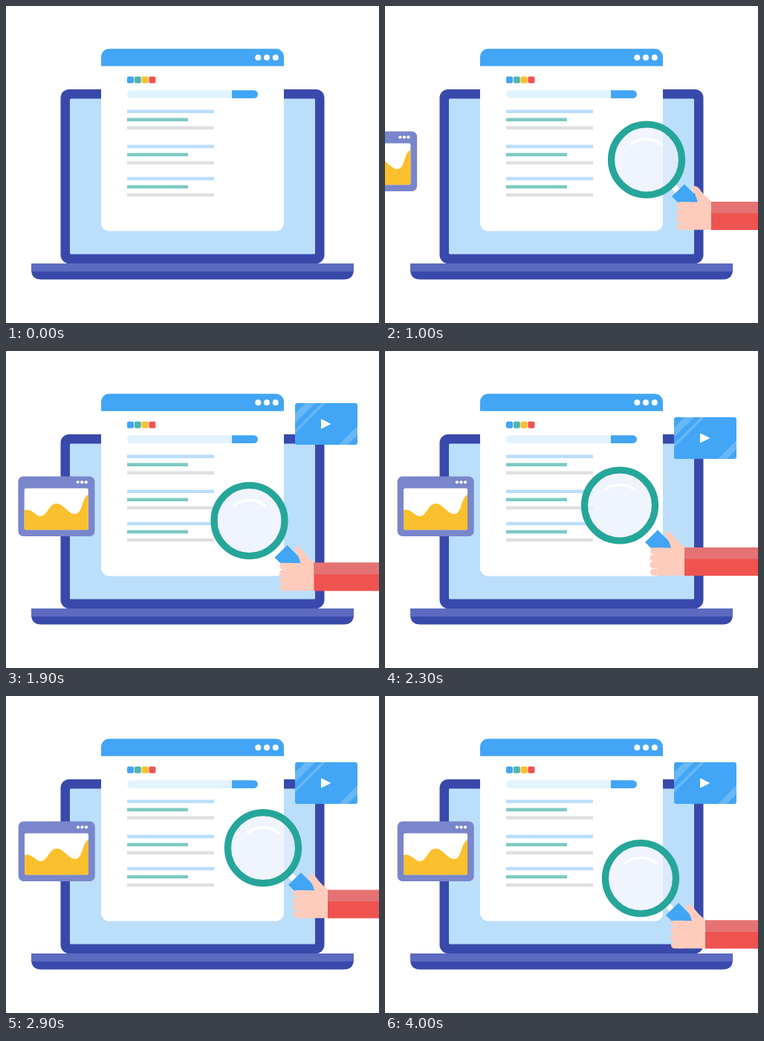
Write an HTML page that moves like this. It is 502 by 426 pixels and loops after 5 s.

```html
<!DOCTYPE html>
<html lang="en">
<head>
<meta charset="utf-8">
<title>Search illustration</title>
<style>
  html, body { margin: 0; width: 100%; height: 100%; overflow: hidden; background: #fff; }
  svg { display: block; width: 100vw; height: 100vh; }
</style>
</head>
<body>
<svg viewBox="0 0 502 426">
  <defs>
    <clipPath id="cardClip"><rect x="389" y="89" width="84" height="56" rx="3"/></clipPath>
    <g id="result">
      <path d="M163 2.2H280" stroke="#bbdefb"/>
      <path d="M163 13.2H245" stroke="#7ecac3"/>
      <path d="M163 24.2H280" stroke="#e0e0e0"/>
    </g>
  </defs>

  <g id="laptop">
    <rect x="73.5" y="112" width="355" height="234" rx="11.5" fill="#3949ab"/>
    <rect x="86" y="124.5" width="330" height="209" rx="1.5" fill="#bbdefb"/>
    <path d="M34 346H468V354Q468 367.5 454.500 367.5H47.500Q34 367.5 34 354Z" fill="#3949ab"/>
    <path d="M34 346H468V356.700H34Z" fill="#5c6bc0"/>
  </g>

  <g id="page">
    <rect x="128" y="57.5" width="246" height="245" rx="11" fill="#fff"/>
    <path d="M128 80.700V68.500A11 11 0 0 1 139 57.500H363A11 11 0 0 1 374 68.500V80.700Z" fill="#42a5f5"/>
    <g fill="#fff">
      <circle cx="339.300" cy="69.200" r="4"/><circle cx="351" cy="69.200" r="4"/><circle cx="362.800" cy="69.200" r="4"/>
    </g>
    <rect x="163" y="94.800" width="9" height="9" rx="2" fill="#42a5f5"/>
    <rect x="172.800" y="94.800" width="9" height="9" rx="2" fill="#4db6ac"/>
    <rect x="182.600" y="94.800" width="9" height="9" rx="2" fill="#fbc02d"/>
    <rect x="192.400" y="94.800" width="9" height="9" rx="2" fill="#ef5350"/>
    <rect x="163" y="113.200" width="160" height="10.800" rx="5.400" fill="#e1f3fe"/>
    <path d="M304 113.200H333.600A5.400 5.400 0 0 1 333.600 124H304Z" fill="#42a5f5"/>
    <g stroke-width="4.500">
      <use href="#result" y="139.500"/><use href="#result" y="186.500"/><use href="#result" y="229.800"/>
    </g>
  </g>

  <g id="chart">
    <rect x="16.700" y="168.500" width="103" height="80.500" rx="7" fill="#7986cb"/>
    <g fill="#fff">
      <circle cx="97" cy="176.300" r="2.100"/><circle cx="102.500" cy="176.300" r="2.100"/><circle cx="108" cy="176.300" r="2.100"/>
      <rect x="25" y="184.500" width="86" height="55.700" rx="2"/>
    </g>
    <path d="M25 214C34 210 40 222 47 222C56 222 58 205 68 205C78 205 84 219 93 219C104 219 101 199 111 193V238.200Q111 240.200 109 240.200H27Q25 240.200 25 238.200Z" fill="#fbc02d"/>
  </g>

  <g id="video">
    <g clip-path="url(#cardClip)">
      <rect x="389" y="89" width="84" height="56" fill="#42a5f5"/>
      <path d="M403 89H416L389 116V103ZM425 89H430L389 130V125ZM448 145H460L473 132V120Z" fill="#68b7f7"/>
    </g>
    <path d="M424.500 111L436.500 117L424.500 123Z" fill="#fff" stroke="#fff" stroke-linejoin="round"/>
  </g>

  <g id="glass">
    <path d="M34 34L45 45" stroke="#fff" stroke-width="8"/>
    <path d="M51 33L79 61L62 77L34 49.500Z" fill="#42a5f5"/>
    <circle r="47.500" fill="#eaeffc" fill-opacity=".7"/>
    <circle r="47.500" fill="none" stroke="#26a69a" stroke-width="9.200"/>
    <path d="M-20.500 -20.500A33 33 0 0 1 20.500 -20.500" fill="none" stroke="#fff" stroke-width="3.500" stroke-linecap="round"/>
    <g fill="#ffccbc">
      <path d="M61.500 40Q60 36 64 35.500Q68 35 71 39Q77 48 87.500 56V94.200H51V57H69Q67 49 61.500 40Z"/>
      <rect x="41" y="56.700" width="20" height="8.700" rx="4"/>
      <rect x="40.500" y="66" width="20" height="9.200" rx="4.400"/>
      <rect x="40.500" y="75.400" width="20" height="9.200" rx="4.400"/>
      <rect x="41" y="85" width="20" height="9.200" rx="4.400"/>
    </g>
    <rect x="87" y="56.500" width="200" height="38" fill="#ef5350"/>
    <rect x="87" y="56.500" width="200" height="15.500" fill="#e57373"/>
  </g>
</svg>
<script>
const LOOP = 5000, STEP = 100;
const el = id => document.getElementById(id);
const chart = el('chart'), video = el('video'), glass = el('glass');

// Lens centre: time, x, y
const path = [
  [300, 572, 241], [600, 482, 233], [1000, 352, 206.5], [1400, 321, 202.2],
  [1650, 333, 215], [1900, 327.5, 228], [2100, 319.5, 228], [2300, 316, 207.5],
  [2600, 329, 182.5], [2900, 346, 204.2], [3200, 344, 245]
];

const progress = (t, start, end) => Math.min(1, Math.max(0, (t - start) / (end - start)));
const easeOut = u => Math.sin(u * Math.PI / 2);
const easeInOut = u => (1 - Math.cos(u * Math.PI)) / 2;

function slope(i, k) {
  const a = path[i - 1], b = path[i + 1];
  if (!b) return 0;
  return a ? (b[k] - a[k]) / (b[0] - a[0]) : (b[k] - path[i][k]) / (b[0] - path[i][0]);
}

// Smooth curve through the path points
function along(t, k) {
  const last = path.length - 1;
  t = Math.min(path[last][0], Math.max(path[0][0], t));
  let i = 0;
  while (i < last - 1 && t > path[i + 1][0]) i++;
  const p = path[i], q = path[i + 1], d = q[0] - p[0], u = (t - p[0]) / d, v = 1 - u;
  return p[k] * v * v * (1 + 2 * u) + q[k] * u * u * (3 - 2 * u)
    + d * u * v * (slope(i, k) * v - slope(i + 1, k) * u);
}

const move = (node, x, y) => node.setAttribute('transform', `translate(${x.toFixed(2)} ${y.toFixed(2)})`);

function draw(now) {
  const t = Math.floor(now % LOOP / STEP) * STEP;
  move(chart, -120 * (1 - easeOut(progress(t, 704, 1960))), 0);
  move(video, 0, -146 * (1 - easeInOut(progress(t, 1239, 2103))));
  move(glass, along(t, 1), along(t, 2));
}

const start = performance.now();
function tick() {
  draw(performance.now() - start);
  requestAnimationFrame(tick);
}
tick();
</script>
</body>
</html>
```
